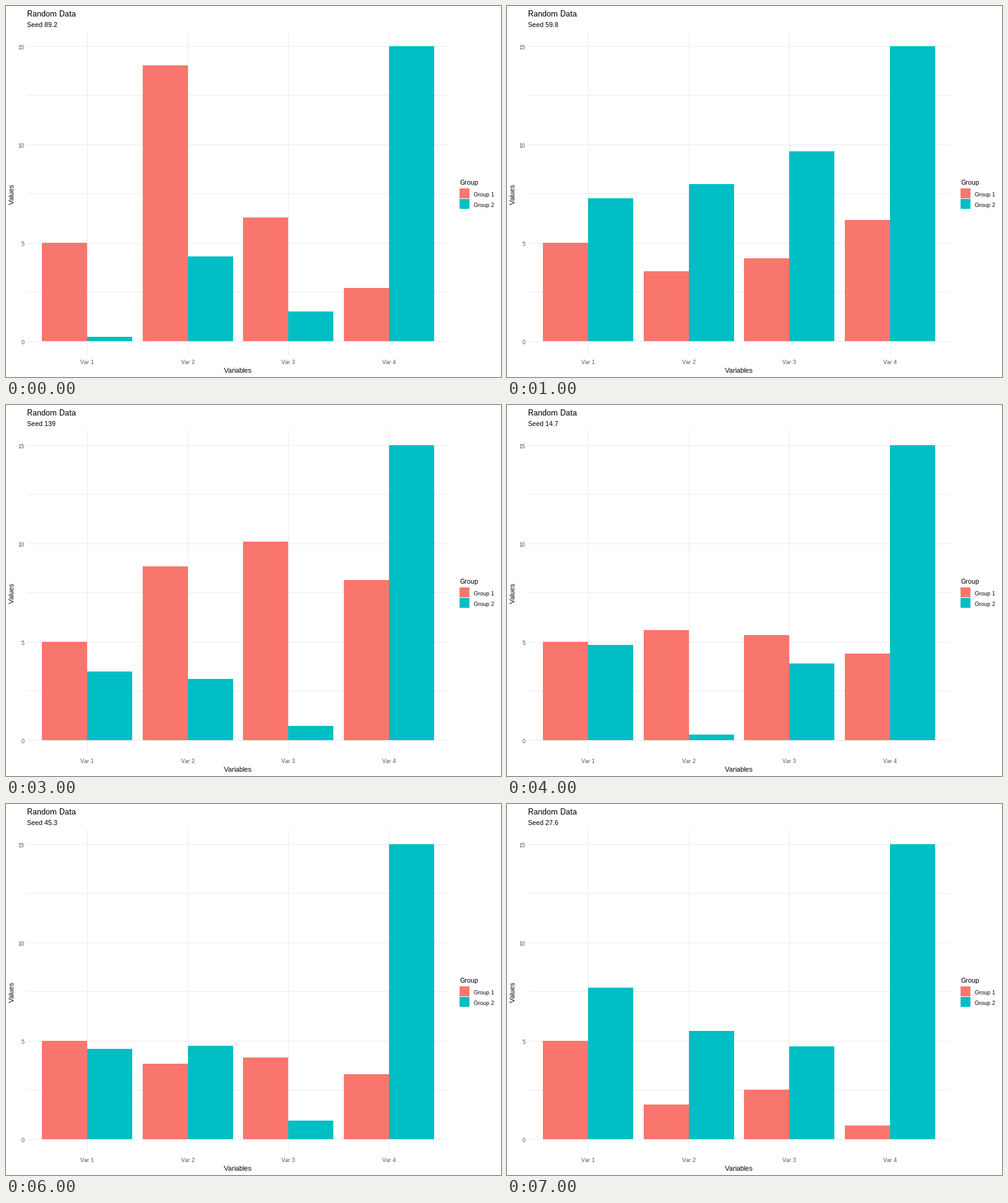
A matplotlib script that plays this animation: 800 px wide and 600 px high, repeating every 8000 ms.

```python
import matplotlib.pyplot as plt
from matplotlib.animation import FuncAnimation
from matplotlib.patches import Rectangle

plt.rcParams.update({
    "font.family": "Liberation Sans",
    "text.hinting": "native",
    "text.hinting_factor": 1,
    "toolbar": "None",
})

W, H, DPI = 800, 600, 100
CORAL, TEAL, GRID, GRAY = "#F8766D", "#00BFC4", "#EBEBEB", "#4D4D4D"
BASE, UNIT, BAR = 542, 31.8, 73
CENTERS = (131, 294, 456, 619)
FIRST, LAST = 5, 15  # the outermost bars are fixed

# seed label and the six free values, alternating group 2 / group 1
STEPS = [
    ("89.2", (0.22, 14.03, 4.31, 6.29, 1.51, 2.70)),
    ("59.8", (7.26, 3.55, 7.99, 4.21, 9.65, 6.16)),
    ("57.9", (9.31, 5.72, 1.60, 7.01, 11.19, 2.86)),
    ("139", (3.49, 8.84, 3.11, 10.09, 0.72, 8.14)),
    ("14.7", (4.85, 5.60, 0.28, 5.35, 3.90, 4.40)),
    ("61.9", (1.64, 2.77, 3.40, 1.10, 1.57, 5.88)),
    ("45.3", (4.60, 3.85, 4.75, 4.15, 0.94, 3.30)),
    ("27.6", (7.70, 1.76, 5.50, 2.52, 4.72, 0.69)),
]

fig = plt.figure(figsize=(W / DPI, H / DPI), dpi=DPI, facecolor="white")
ax = fig.add_axes([0, 0, 1, 1])
ax.set_xlim(0, W)
ax.set_ylim(H, 0)
ax.axis("off")


def rect(x, y, w, h, color, z=1):
    return ax.add_patch(Rectangle((x, y), w, h, facecolor=color, linewidth=0,
                                  antialiased=False, zorder=z))


def label(x, y, text, px, color="black", ha="left", **kw):
    kw.setdefault("va", "baseline")
    return ax.text(x, y, text, fontsize=px * 72 / DPI, color=color, ha=ha, **kw)


def top_of(value):
    return round(BASE - value * UNIT)


# grid
for y in (65, 144, 224, 303, 383, 462, 542):
    rect(34, y, 682, 1, GRID)
for x in CENTERS:
    rect(x, 41, 1, 524, GRID)

# axes
for value in (0, 5, 10, 15):
    label(29.5, top_of(value) + 5, str(value), 9, GRAY, "right")
for i, x in enumerate(CENTERS, 1):
    label(x, 579, f"Var {i}", 9, GRAY, "center")
label(375, 593, "Variables", 11, ha="center")
label(15, 304, "Values", 11, ha="right", va="center", rotation=90)

# titles and legend
label(34, 17, "Random Data", 13)
subtitle = label(34, 34, "", 11)
label(733, 289, "Group", 11)
for i, color in enumerate((CORAL, TEAL)):
    rect(733, 295 + 17 * i, 16, 16, color)
    label(756, 308 + 17 * i, f"Group {i + 1}", 9)

bars = []
for x in CENTERS:
    bars += [rect(x - BAR, BASE, BAR, 0, CORAL, 2), rect(x, BASE, BAR, 0, TEAL, 2)]


def draw(step):
    seed, free = STEPS[step]
    subtitle.set_text(f"Seed {seed}")
    for bar, value in zip(bars, (FIRST, *free, LAST)):
        top = top_of(value)
        bar.set_y(top)
        bar.set_height(BASE - top)
    return [subtitle, *bars]


anim = FuncAnimation(fig, draw, frames=len(STEPS), interval=1000,
                     repeat=True, repeat_delay=0, blit=False)
plt.show()
```
